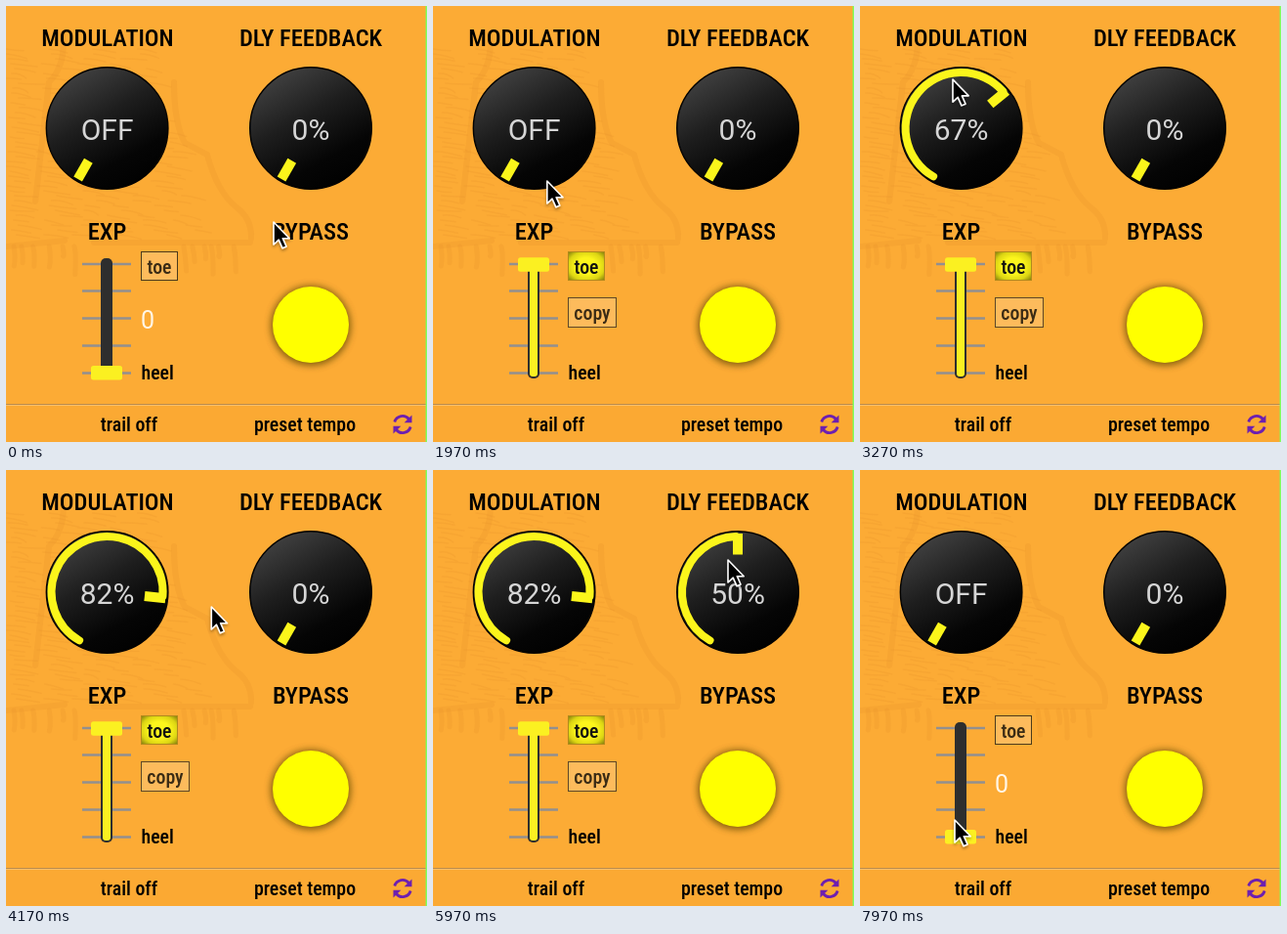
These frames come from a looping animation (431 by 446 pixels, 8 s). An HTML page:

```html
<!DOCTYPE html>
<html lang="en">
<head>
<meta charset="utf-8">
<title>Pedal controls</title>
<style>
  html, body { margin: 0; width: 100%; height: 100%; overflow: hidden; background: #fcab35; }
  svg { display: block; width: 431px; height: 446px; }
  text { font-family: "Roboto Condensed", Roboto, sans-serif; font-stretch: condensed; font-weight: 500; font-size: 19.8px; }
  .title { font-size: 24.5px; text-anchor: middle; }
  .value { font-family: Roboto, sans-serif; font-stretch: normal; font-weight: 400; font-size: 30px; fill: #d6d6d6; text-anchor: middle; }
  .zero { font-size: 25px; fill: #fff6e6; text-anchor: start; }
  .mid { text-anchor: middle; }
</style>
</head>
<body>
<svg viewBox="0 0 431 446">
  <defs>
    <linearGradient id="dome" x1=".22" y1="0" x2=".78" y2="1">
      <stop offset="0" stop-color="#444"/>
      <stop offset=".4" stop-color="#1e1e1e"/>
      <stop offset=".75" stop-color="#050505"/>
      <stop offset="1" stop-color="#000"/>
    </linearGradient>
    <radialGradient id="pressed" cx=".5" cy=".5" r=".72">
      <stop offset=".4" stop-color="#fcf51c"/>
      <stop offset=".7" stop-color="#dcd513"/>
      <stop offset="1" stop-color="#77720a"/>
    </radialGradient>
    <filter id="soft" x="-30%" y="-30%" width="160%" height="160%"><feGaussianBlur stdDeviation="3.5"/></filter>
    <filter id="shade" x="-50%" y="-50%" width="200%" height="200%">
      <feDropShadow dx="0" dy="2" stdDeviation="1.5" flood-opacity=".35"/>
    </filter>
  </defs>

  <rect width="431" height="446" fill="#fcab35"/>
  <g fill="none" stroke="#df8b28" stroke-linecap="round">
    <path id="hatch" opacity=".2" stroke-width="1.5"/>
    <path opacity=".2" stroke-width="6" d="M172 78Q172 120 183 140L206 152Q216 190 236 206Q252 218 251 238M90 242L250 242M0 246L60 240M58 28Q62 60 44 78L30 200"/>
    <path id="drips" opacity=".2" stroke-width="5"/>
  </g>
  <rect y="408" width="431" height="38" fill="#fba933"/>
  <path d="M0 407.5H430" stroke="#b98b4c"/>
  <path d="M0 408.5H430" stroke="#fdc06a"/>
  <path d="M430.3 0V446" stroke="#7dff5a" stroke-width="1.4"/>

  <text class="title" x="104" y="41">MODULATION</text>
  <text class="title" x="312" y="41">DLY FEEDBACK</text>
  <text class="title" x="103.5" y="239">EXP</text>
  <text class="title" x="312" y="239">BYPASS</text>
  <g id="knobs"></g>

  <path d="M78 264H128M78 291.5H128M78 319.5H128M78 347.5H128M78 375.5H128" stroke="#929090" stroke-width="2.5"/>
  <rect x="97" y="258" width="12" height="123" rx="5" fill="#2e2e2e"/>
  <rect id="fill" x="99" y="262" width="8" height="117" rx="3" fill="#fbf021"/>
  <rect id="handle" x="87" width="32" height="14.5" rx="2.5" fill="#fbf021"/>
  <text id="zero" class="value zero" x="138" y="330">0</text>
  <text x="138.5" y="382">heel</text>
  <g id="toe">
    <rect x="138.5" y="251.5" width="37" height="29"/>
    <text class="mid" x="157" y="274">toe</text>
  </g>
  <g id="copy">
    <rect x="138.5" y="298.5" width="49" height="30" fill="#fdbb5c" stroke="#5c4727"/>
    <text class="mid" x="163" y="321" fill="#3a2b15">copy</text>
  </g>

  <circle cx="312" cy="327" r="41" fill="#5e4700" opacity=".75" filter="url(#soft)"/>
  <circle cx="312" cy="326" r="39" fill="#ff0"/>

  <text class="mid" x="126" y="435">trail off</text>
  <text class="mid" x="306" y="435">preset tempo</text>
  <g fill="#6d1fb0">
    <g id="half">
      <path d="M397.8 425.500A8.500 8.500 0 0 1 412.500 422.500" fill="none" stroke="#6d1fb0" stroke-width="2.800"/>
      <path d="M415.500 418.500V426.300H407.700Z"/>
    </g>
    <use href="#half" transform="rotate(180 406 428)"/>
  </g>

  <g id="ring" fill="none">
    <circle stroke="#fff" stroke-width="5"/>
    <circle stroke="#000" stroke-width="3"/>
  </g>
  <g id="cursor" filter="url(#shade)" stroke-linejoin="round">
    <path id="arrow" d="M0 0V23L5.200 18.200L9 26.700L13 25L9.300 16.700H16.200Z" fill="#000" stroke="#fff" stroke-width="1.6"/>
    <g id="hand" transform="translate(0 2)" fill="#fff" stroke="#111" stroke-width="1.6">
      <path d="M2 7Q1.500 4.500 3.700 4.500Q5.800 4.500 6.300 6.500L8.200 13.500Q9 11.500 11 12.500L11.600 14Q13.500 12.300 15.200 14.500Q17.600 13.800 18.500 16.500L20 22Q20.400 25 18.300 29H8.500Q6.500 25.500 1.800 22.300Q-2.700 18.500-.8 17.400Q.8 16.600 4.600 19.700Z"/>
      <path d="M10 20.500L11 25.500M13.100 20L14 25M16 19.500L16.800 24.500" stroke-width="1.2"/>
    </g>
  </g>
</svg>
<script>
const LOOP = 8000, TOE_ON = 1250, TOE_OFF = 7120;
const PRESSES = [1110, 2490, 5030, 7000];
const $ = id => document.getElementById(id);
const set = (node, attrs) => { for (const key in attrs) node.setAttribute(key, attrs[key]); };
const show = (node, on) => set(node, { visibility: on ? 'visible' : 'hidden' });

const EASE = {
  lin: p => p,
  in: p => p * p,
  out: p => p * (2 - p),
  both: p => p * p * (3 - 2 * p)
};

// Each step: time, x, y, easing towards this step.
const PATH = [
  [0, 274, 221], [150, 274, 221], [800, 167, 264, 'both'], [1400, 167, 264],
  [2300, 95, 142, 'both'], [2500, 95, 142], [3450, 95, 60], [3650, 95, 60],
  [4170, 210, 140, 'in'], [4750, 302, 142, 'out'], [5030, 302, 142],
  [5930, 302, 92], [6100, 302, 92], [6600, 160, 308, 'both'], [6750, 160, 308],
  [6870, 160, 280], [6960, 160, 268, 'out'], [7160, 160, 268],
  [7500, 236, 146, 'both'], [7540, 236, 146], [7940, 97, 358, 'both'], [8000, 97, 358]
];
const MODULATION = [[0, 0], [2500, 0], [2730, 21], [3450, 82], [8000, 82]];
const FEEDBACK = [[0, 0], [5030, 0], [5270, 8], [5930, 50], [8000, 50]];

function sample(steps, t, column) {
  const i = Math.max(1, steps.findIndex(step => step[0] >= t));
  const a = steps[i - 1], b = steps[i];
  const p = (t - a[0]) / (b[0] - a[0]);
  return a[column] + (b[column] - a[column]) * EASE[b[3] || 'lin'](p);
}

function makeKnob(cx, zeroText) {
  const group = document.createElementNS('http://www.w3.org/2000/svg', 'g');
  group.innerHTML = `
    <circle r="62.3" fill="url(#dome)" stroke="#000" stroke-width="1.4"/>
    <path fill="none" stroke="#fbf51b" stroke-width="8" stroke-linecap="round"/>
    <rect x="-5" y="-60" width="10" height="21.5" fill="#fbf51b"/>
    <text class="value" y="11.5"></text>`;
  set(group, { transform: `translate(${cx} 125)` });
  $('knobs').append(group);
  const [, arc, marker, label] = group.children;
  const point = deg => {
    const a = deg * Math.PI / 180;
    return `${57 * Math.sin(a)} ${-57 * Math.cos(a)}`;
  };
  return value => {
    const angle = -150 + 3 * value;
    // Stop short of the marker so that the round cap stays beneath it.
    const end = Math.max(-150, angle - 2);
    show(arc, value > 0);
    set(arc, { d: `M${point(-150)}A57 57 0 ${end > 30 ? 1 : 0} 1 ${point(end)}` });
    set(marker, { transform: `rotate(${angle})` });
    label.textContent = value < .5 ? zeroText : Math.round(value) + '%';
  };
}

function drawTexture() {
  let seed = 7, hatch = '', drips = '';
  const random = () => (seed = seed * 16807 % 2147483647) / 2147483647;
  for (let y = 44; y < 238; y += 5) {
    const edge = 125 + y * .32;
    for (let x = random() * 14; x < edge; x += 28 + random() * 22)
      hatch += `M${x} ${y}q9 ${random() * 3 - 1} ${14 + random() * 14} ${1 + random() * 4}`;
  }
  for (const left of [8, 182])
    for (let x = left; x < left + 68; x += 7 + random() * 12)
      drips += `M${x} 246q2 ${6 + random() * 8} ${random() * 3} ${6 + random() * 34}`;
  set($('hatch'), { d: hatch });
  set($('drips'), { d: drips });
}

const setModulation = makeKnob(103.6, 'OFF');
const setFeedback = makeKnob(312, '0%');
const [toeBox, toeText] = $('toe').children;
const inside = (x, y, left, top, right, bottom) => x >= left && x <= right && y >= top && y <= bottom;

function render(t) {
  const toeOn = t >= TOE_ON && t < TOE_OFF;
  const x = sample(PATH, t, 1);
  setModulation(toeOn ? sample(MODULATION, t, 1) : 0);
  setFeedback(toeOn ? sample(FEEDBACK, t, 1) : 0);

  // A drag moves one pixel per percent.
  let y = sample(PATH, t, 2);
  if (t > 2500 && t < 3450) y = 142 - sample(MODULATION, t, 1);
  if (t > 5030 && t < 5930) y = 142 - sample(FEEDBACK, t, 1);

  const overToe = inside(x, y, 138, 251, 176, 281);
  const overCopy = toeOn && inside(x, y, 138, 279, 188, 329);
  show($('fill'), toeOn);
  show($('zero'), !toeOn);
  show($('copy'), toeOn);
  set($('handle'), { y: toeOn ? 257.3 : 368 });
  set(toeBox, {
    fill: toeOn ? 'url(#pressed)' : overToe ? '#f0ea10' : '#fdbb5c',
    stroke: toeOn ? '#b08a1c' : '#4a3a1c'
  });
  set(toeText, { fill: toeOn || overToe ? '#111' : '#3a2b15' });

  const pointing = overToe || overCopy;
  set($('cursor'), { transform: `translate(${x} ${y})` });
  show($('arrow'), !pointing);
  show($('hand'), pointing);

  const age = t - PRESSES.findLast(time => time <= t);
  const pressed = age >= 0 && age < 480;
  show($('ring'), pressed);
  if (pressed) {
    set($('ring'), {
      transform: `translate(${x - 3} ${y - 1})`,
      opacity: Math.min(1, (480 - age) / 180)
    });
    for (const circle of $('ring').children) set(circle, { r: Math.max(33.5, 48 - age * .063) });
  }
}

drawTexture();

const start = performance.now();
function tick() {
  render((performance.now() - start) % LOOP);
  requestAnimationFrame(tick);
}
tick();
</script>
</body>
</html>
```
